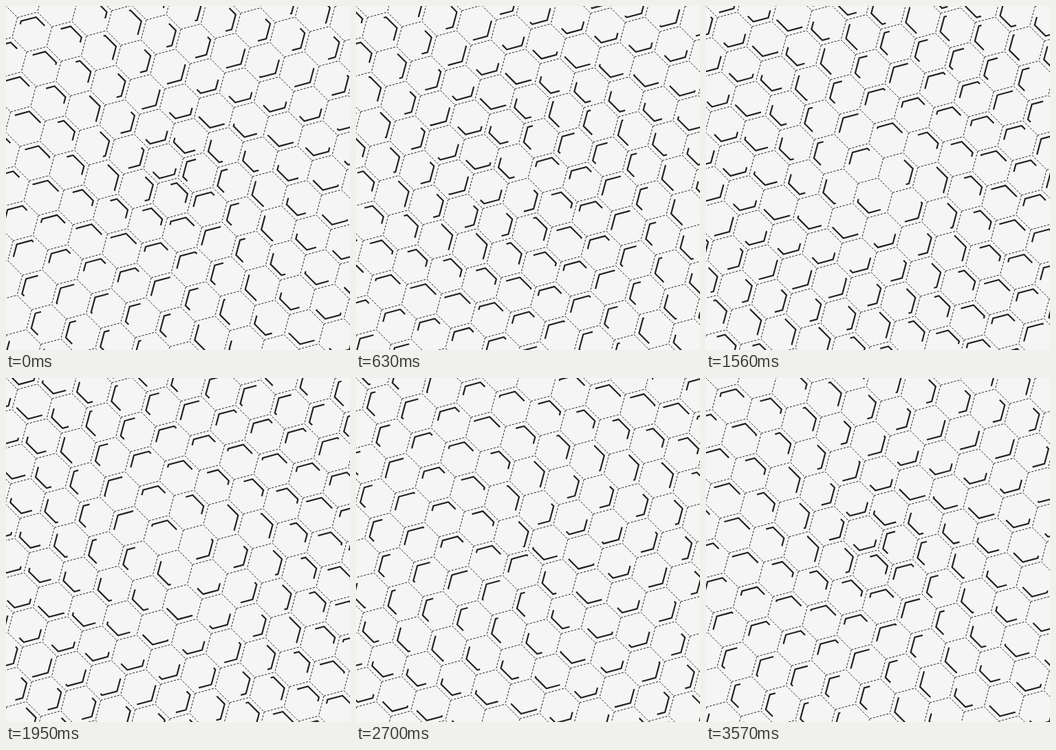
An HTML page for the animation above (3.6 s loop, 500 by 500 pixels).

```html
<!DOCTYPE html>
<html lang="en">
<head>
<meta charset="utf-8">
<title>Hexagon spiral</title>
<style>
  html, body { margin: 0; width: 100%; height: 100%; overflow: hidden; background: #f5f5f5; }
  svg { display: block; width: 500px; height: 500px; }
  path { fill: none; stroke: #222; }
  .cell { stroke-width: 1; stroke-dasharray: 3 2; }
  .runner {
    stroke-width: 2.2;
    stroke-dasharray: 2 20;
    animation: run 3.6s linear infinite;
  }
  @keyframes run {
    from { stroke-dashoffset: calc(var(--start) * -1px); }
    to { stroke-dashoffset: calc(var(--start) * -1px - 6px); }
  }
</style>
</head>
<body>
<svg id="stage" viewBox="0 0 500 500"></svg>
<script>
  const stage = document.getElementById('stage');
  const SIZE = 500, MID = SIZE / 2;
  const SIDE = 30, INNER = 22.5;
  const TILT = Math.PI / 12;
  const STEP = SIDE * Math.sqrt(3);
  const TWIST = 0.0104, PHASE = -0.84;

  const polar = (r, a) => [r * Math.cos(a), r * Math.sin(a)];

  // Walks the hexagon clockwise from its upper left corner.
  function hexPath(cx, cy, r, edges) {
    const points = [];
    for (let i = 0; i <= edges; i++) {
      const [x, y] = polar(r, -9 * TILT + i * Math.PI / 3);
      points.push((cx + x).toFixed(2) + ' ' + (cy + y).toFixed(2));
    }
    return 'M' + points.join('L');
  }

  function addPath(name, d) {
    const path = document.createElementNS('http://www.w3.org/2000/svg', 'path');
    path.setAttribute('class', name);
    path.setAttribute('d', d);
    stage.append(path);
    return path;
  }

  function addCell(x, y) {
    const dx = x - MID, dy = y - MID;
    const turn = Math.atan2(dy, dx) / (Math.PI / 3);
    const start = turn + PHASE - TWIST * Math.hypot(dx, dy);
    // Three edges are enough, the neighbours draw the others.
    addPath('cell', hexPath(x, y, SIDE, 3));
    // The extra laps let the runner cross the first corner unbroken.
    const runner = addPath('runner', hexPath(x, y, INNER, 14));
    runner.setAttribute('pathLength', 14);
    runner.style.setProperty('--start', ((start % 6 + 6) % 6).toFixed(3));
  }

  const [ux, uy] = polar(STEP, TILT);
  const [vx, vy] = polar(STEP, 5 * TILT);
  const [ox, oy] = polar(SIDE, -9 * TILT);
  for (let a = -9; a <= 9; a++) {
    for (let b = -9; b <= 9; b++) {
      const x = MID + ox + a * ux + b * vx;
      const y = MID + oy + a * uy + b * vy;
      if (Math.max(Math.abs(x - MID), Math.abs(y - MID)) < MID + 2 * SIDE) addCell(x, y);
    }
  }
</script>
</body>
</html>
```
